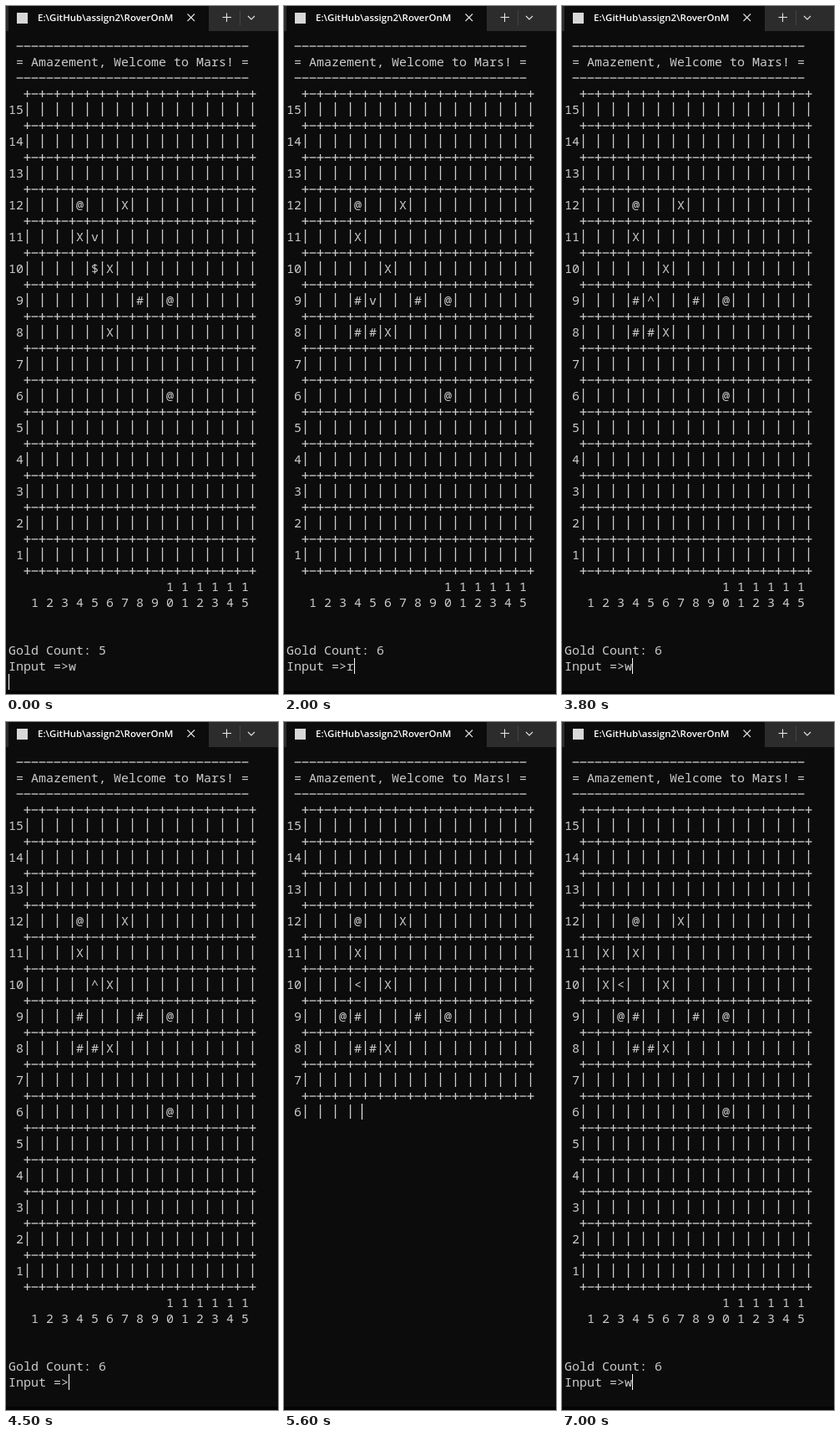
An HTML page with a canvas that plays this animation: 326 px wide and 822 px high, repeating every 8000 ms.

```html
<!DOCTYPE html>
<html lang="en">
<head>
<meta charset="utf-8">
<title>Rover console</title>
<style>
  html, body { margin: 0; width: 100%; height: 100%; overflow: hidden; background: #0c0c0c; }
  canvas { display: block; }
</style>
</head>
<body>
<canvas id="stage" width="326" height="822"></canvas>
<script>
const ctx = document.getElementById('stage').getContext('2d');
const LOOP = 8000, LEFT = 3, TOP = 38, CW = 9, LH = 19, SIZE = 15;
const INPUT = 39;

// Rover poses: column, row, heading
const poses = [
  [5, 11, 'v'], [5, 10, 'v'], [5, 9, 'v'], [5, 9, '<'], [5, 9, '^'],
  [5, 10, '^'], [5, 10, '<'], [4, 10, '<'], [3, 10, '<']
];

// Map items: column, row, symbol, first pose that reveals it
const items = [
  [4, 12, '@', 0], [7, 12, 'X', 0], [4, 11, 'X', 0], [5, 10, '$', 0],
  [6, 10, 'X', 0], [8, 9, '#', 0], [10, 9, '@', 0], [6, 8, 'X', 0],
  [10, 6, '@', 0], [4, 9, '#', 1], [4, 8, '#', 2], [5, 8, '#', 2],
  [3, 9, '@', 7], [2, 11, 'X', 8], [2, 10, 'X', 8]
];

// Steps: start, pose, typed key, line and column printed so far, cursor shown
const steps = [
  [0, 0, 'w', 40, 0, 1],
  [100, 1, '', 0, 0, 1],
  [200, 1, '', 14, 0, 1],
  [300, 1, '', INPUT, 8, 1],
  [700, 1, 'w', INPUT, 9, 1],
  [1200, 2, '', 16, 1, 1],
  [1500, 2, '', INPUT, 8, 0],
  [2000, 2, 'r', INPUT, 9, 1],
  [2400, 2, 'r', 40, 0, 1],
  [2600, 3, '', 20, 0, 1],
  [2700, 3, '', INPUT, 8, 0],
  [3300, 3, 'r', INPUT, 9, 1],
  [3600, 4, '', 18, 0, 1],
  [3800, 4, 'w', INPUT, 9, 1],
  [4200, 4, 'w', 40, 0, 1],
  [4300, 5, '', 22, 0, 1],
  [4500, 5, '', INPUT, 8, 1],
  [4600, 5, 'l', INPUT, 9, 1],
  [4700, 5, 'l', 40, 0, 1],
  [4900, 6, '', 24, 0, 1],
  [5100, 6, 'w', INPUT, 9, 1],
  [5600, 7, '', 22, 10, 1],
  [5800, 7, 'w', INPUT, 9, 1],
  [6200, 7, 'w', 40, 0, 1],
  [6300, 8, '', 33, 0, 1],
  [6500, 8, '', INPUT, 8, 1],
  [6600, 8, '', INPUT, 8, 0],
  [7000, 8, 'w', INPUT, 9, 1]
];

function screenLines(pose, key) {
  const [rx, ry, heading] = poses[pose];
  const symbol = (x, y) => {
    if (x === rx && y === ry) return heading;
    const item = items.find(i => i[0] === x && i[1] === y && pose >= i[3]);
    return item && !(item[2] === '$' && pose > 0) ? item[2] : ' ';
  };
  const cols = Array.from({ length: 15 }, (_, i) => i + 1);
  const rule = ' ' + '-'.repeat(31);
  const border = '  ' + '+-'.repeat(15) + '+';
  const lines = [rule, ' = Amazement, Welcome to Mars! =', rule, border];
  for (let y = 15; y > 0; y--) {
    lines.push(String(y).padStart(2) + '|' + cols.map(x => symbol(x, y) + '|').join(''), border);
  }
  lines.push('   ' + cols.map(x => x > 9 ? '1' : ' ').join(' '));
  lines.push('   ' + cols.map(x => x % 10).join(' '));
  lines.push('', '', 'Gold Count: ' + (pose ? 6 : 5), 'Input =>' + key);
  return lines;
}

function drawChar(ch, x, y) {
  if (ch === '-') ctx.fillRect(x + 0.6, y + 9.4, 7.8, 1.3);
  else if (ch === '|') ctx.fillRect(x + 3.9, y + 1, 1.3, 17);
  else if (ch === '+') {
    ctx.fillRect(x + 0.5, y + 9.4, 8, 1.3);
    ctx.fillRect(x + 3.9, y + 6, 1.3, 8);
  } else if (ch !== ' ') ctx.fillText(ch, x, y + 15);
}

function line(...points) {
  ctx.beginPath();
  points.forEach(([x, y]) => ctx.lineTo(x, y));
  ctx.stroke();
}

function drawTabBar() {
  ctx.fillStyle = '#2c2c2c';
  ctx.fillRect(0, 0, 326, 30);
  ctx.fillStyle = '#0c0c0c';
  ctx.beginPath();
  ctx.roundRect(3, -4, 240, 40, 6);
  ctx.fill();
  ctx.fillStyle = '#d8d8d8';
  ctx.fillRect(13, 8, 13, 13);
  ctx.fillStyle = '#fff';
  ctx.font = '600 11.5px "Open Sans", sans-serif';
  ctx.fillText('E:\\GitHub\\assign2\\RoverOnM', 38, 18);
  ctx.strokeStyle = '#e4e4e4';
  ctx.lineWidth = 1.1;
  line([217.5, 9.5], [226, 18]);
  line([226, 9.5], [217.5, 18]);
  line([259.5, 13.5], [270, 13.5]);
  line([264.5, 8.5], [264.5, 19]);
  line([290, 12], [294, 16], [298, 12]);
  ctx.strokeStyle = '#444';
  line([280.5, 5], [280.5, 23]);
}

function draw(t) {
  const [, pose, key, row, col, cursor] = steps.findLast(s => s[0] <= t);
  ctx.fillStyle = '#0c0c0c';
  ctx.fillRect(0, 0, 326, 822);
  ctx.fillStyle = '#050505';
  ctx.fillRect(0, 818, 326, 4);
  drawTabBar();
  ctx.fillStyle = '#ccc';
  ctx.font = SIZE + 'px "Noto Sans Mono", monospace';
  screenLines(pose, key).slice(0, row + 1).forEach((text, r) => {
    const shown = r === row ? text.slice(0, col) : text;
    [...shown].forEach((ch, c) => drawChar(ch, LEFT + c * CW, TOP + r * LH));
  });
  if (cursor) {
    ctx.fillStyle = '#fff';
    ctx.fillRect(LEFT + col * CW, TOP + row * LH, 1, LH);
  }
}

function tick() {
  draw(performance.now() % LOOP);
  requestAnimationFrame(tick);
}
tick();
</script>
</body>
</html>
```
